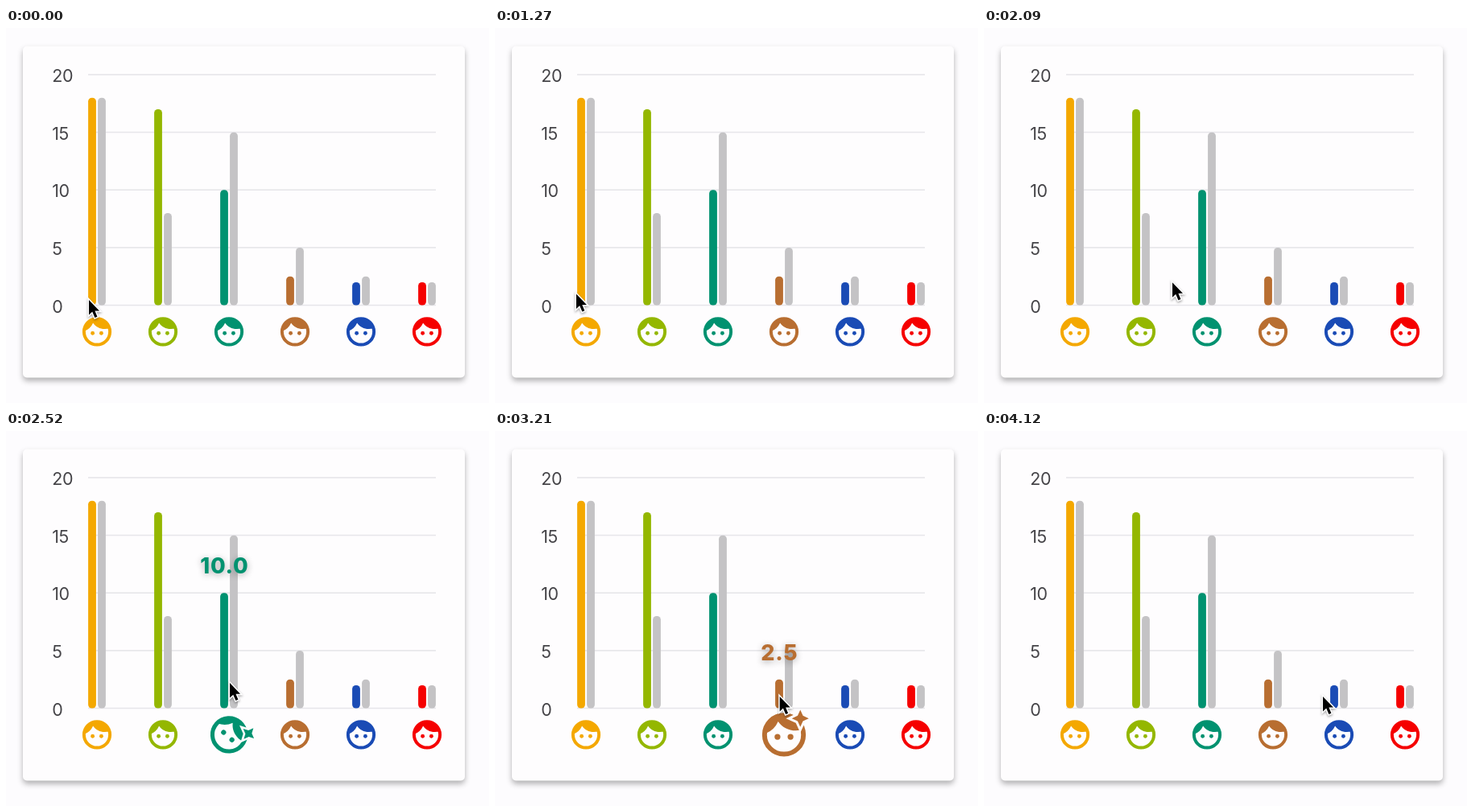
Animation of 600 by 466 pixels, one loop 4.15 s. Source, as an HTML page with a canvas:

```html
<!DOCTYPE html>
<html lang="en">
<head>
<meta charset="utf-8">
<title>Bar chart with hover faces</title>
<style>
  html, body { margin: 0; width: 100%; height: 100%; overflow: hidden; background: #fdfcfe; }
  canvas { display: block; width: 600px; height: 466px; }
</style>
</head>
<body>
<canvas id="stage"></canvas>
<script>
const W = 600, H = 466, LOOP = 4150;
const canvas = document.getElementById('stage');
const ctx = canvas.getContext('2d');
const dpr = window.devicePixelRatio || 1;
canvas.width = W * dpr;
canvas.height = H * dpr;

const BASE = 344.6, UNIT = 14.33, FIRST = 107, STEP = 82;
const CARD = '#fefdfe', FONT = 'Inter, Roboto, sans-serif';
const GROW = 300, TURN = Math.PI * 4;

// hover: times at which the pointer alternately enters and leaves
const bars = [
  { color: '#f4a800', value: 18, other: 18, hover: [15, 785, 1540, 1615] },
  { color: '#94b700', value: 17, other: 8, hover: [1697, 1775] },
  { color: '#009270', value: 10, other: 15, hover: [2424, 2795] },
  { color: '#b86e31', value: 2.5, other: 5, hover: [2902, 3826] },
  { color: '#1a4bb5', value: 2, other: 2.5, hover: [] },
  { color: '#f50000', value: 2, other: 2, hover: [] }
];

// pointer stops: time, x, y
const stops = [
  [0, 103, 338], [400, 110, 331], [790, 99, 335], [1540, 102, 328],
  [1697, 184, 320], [1730, 197, 319], [2520, 278, 313], [2795, 289, 320],
  [2910, 346, 330], [3730, 367, 330], [4120, 421, 330]
];

const arrow = new Path2D('M0 0V18.5L4.2 14.6L7.4 22L10.4 20.7L7.4 13.6H13z');

const bezier = (a, b, u) => 3 * a * u * (1 - u) ** 2 + 3 * b * u * u * (1 - u) + u ** 3;

// cubic-bezier(.25, .1, .25, 1)
function ease(x) {
  if (x <= 0) return 0;
  if (x >= 1) return 1;
  let lo = 0, hi = 1;
  for (let i = 0; i < 24; i++) {
    const mid = (lo + hi) / 2;
    if (bezier(0.25, 0.25, mid) < x) lo = mid; else hi = mid;
  }
  return bezier(0.1, 1, lo);
}

function hoverState(times, t) {
  let from = 0, on = false, start = -GROW;
  const level = now => from + ((on ? 1 : 0) - from) * ease((now - start) / GROW);
  for (const time of times) {
    if (time > t) break;
    from = level(time);
    start = time;
    on = !on;
  }
  return { on, level: level(t) };
}

function pointerAt(t) {
  const i = stops.findIndex(stop => stop[0] > t);
  if (i < 0) return stops[stops.length - 1].slice(1);
  const [t0, x0, y0] = stops[i - 1], [t1, x1, y1] = stops[i];
  const k = (t - t0) / (t1 - t0);
  return [x0 + (x1 - x0) * k, y0 + (y1 - y0) * k];
}

function shadow(color, blur, y) {
  ctx.shadowColor = color;
  ctx.shadowBlur = blur * dpr;
  ctx.shadowOffsetY = y * dpr;
}

function rounded(x, y, w, h, r, color) {
  ctx.fillStyle = color;
  ctx.beginPath();
  ctx.roundRect(x, y, w, h, r);
  ctx.fill();
}

function disc(x, y, r) {
  ctx.beginPath();
  ctx.arc(x, y, r, 0, Math.PI * 2);
}

function star(x, y, r) {
  ctx.beginPath();
  for (let i = 0; i < 8; i++) {
    const d = i % 2 ? r * 0.444 : r, a = i * Math.PI / 4;
    ctx.lineTo(x + d * Math.cos(a), y + d * Math.sin(a));
  }
  ctx.closePath();
}

function drawCard() {
  ctx.fillStyle = '#fdfcfe';
  ctx.fillRect(0, 0, W, H);
  ctx.save();
  shadow('rgba(0,0,0,.3)', 7, 4);
  rounded(21, 22.5, 549, 412, 5, CARD);
  ctx.restore();
}

function drawAxis() {
  ctx.save();
  ctx.font = '21.5px ' + FONT;
  ctx.letterSpacing = '-0.5px';
  for (let v = 0; v <= 20; v += 5) {
    const y = BASE - v * UNIT;
    ctx.fillStyle = '#e7e6ea';
    ctx.fillRect(102, y - 0.9, 432, 1.6);
    ctx.fillStyle = '#454448';
    ctx.fillText(v, 57.3, y + 9);
  }
  ctx.restore();
}

function drawBar(x, value, color) {
  const h = value * UNIT;
  rounded(x - 4.9, BASE - h, 9.8, h, 4.5, color);
}

// Face in units of a 10-unit radius around the centre
function drawFace(x, color, { on, level }) {
  const size = 1.8 * (1 + level / 2);
  ctx.save();
  ctx.translate(x, 377.4);
  ctx.rotate(TURN * level);
  ctx.scale(size, size);
  ctx.fillStyle = ctx.strokeStyle = color;
  ctx.lineWidth = 2.2;
  disc(0, 0, 8.95);
  ctx.stroke();

  ctx.beginPath();
  ctx.moveTo(-8.5, -0.5);
  ctx.quadraticCurveTo(-4.4, -2.2, -2.7, -6.1);
  ctx.bezierCurveTo(-0.9, -3.5, 2, -1.9, 5.4, -1.9);
  ctx.lineTo(8.5, -2.2);
  ctx.arc(0, 0, 9, -0.25, Math.PI + 0.06, true);
  ctx.fill();

  for (const side of [-3, 3]) {
    disc(side, 1, 1.35);
    ctx.fill();
  }
  if (on) {
    ctx.save();
    disc(0, 0, 10.3);
    ctx.clip();
    ctx.fillStyle = CARD;
    star(7.5, -7.5, 6.6);
    ctx.fill();
    ctx.restore();
    star(7.5, -7.5, 3.9);
    ctx.fill();
  }
  ctx.restore();
}

function drawLabel(x, { color, value }) {
  ctx.save();
  ctx.font = '800 27px ' + FONT;
  ctx.letterSpacing = '0.8px';
  ctx.textAlign = 'center';
  ctx.fillStyle = color;
  shadow('rgba(0,0,0,.32)', 9, 2);
  ctx.fillText(value.toFixed(1), x + 0.4, BASE - value * UNIT - 24);
  ctx.restore();
}

function drawPointer(t) {
  ctx.save();
  ctx.translate(...pointerAt(t));
  ctx.lineWidth = 3;
  ctx.strokeStyle = '#fff';
  shadow('rgba(0,0,0,.35)', 3, 1.5);
  ctx.stroke(arrow);
  shadow('transparent', 0, 0);
  ctx.fillStyle = '#000';
  ctx.fill(arrow);
  ctx.restore();
}

function draw(t) {
  ctx.setTransform(dpr, 0, 0, dpr, 0, 0);
  drawCard();
  drawAxis();
  const states = bars.map(bar => hoverState(bar.hover, t));
  const each = paint => bars.forEach((bar, i) => paint(bar, FIRST + i * STEP, states[i]));
  each((bar, x) => {
    drawBar(x, bar.value, bar.color);
    drawBar(x + 12, bar.other, '#c4c3c5');
  });
  each((bar, x, state) => drawFace(x + 6, bar.color, state));
  each((bar, x, state) => state.on && drawLabel(x, bar));
  drawPointer(t);
}

const begin = performance.now();
function tick() {
  draw((performance.now() - begin) % LOOP);
  requestAnimationFrame(tick);
}
tick();
</script>
</body>
</html>
```
